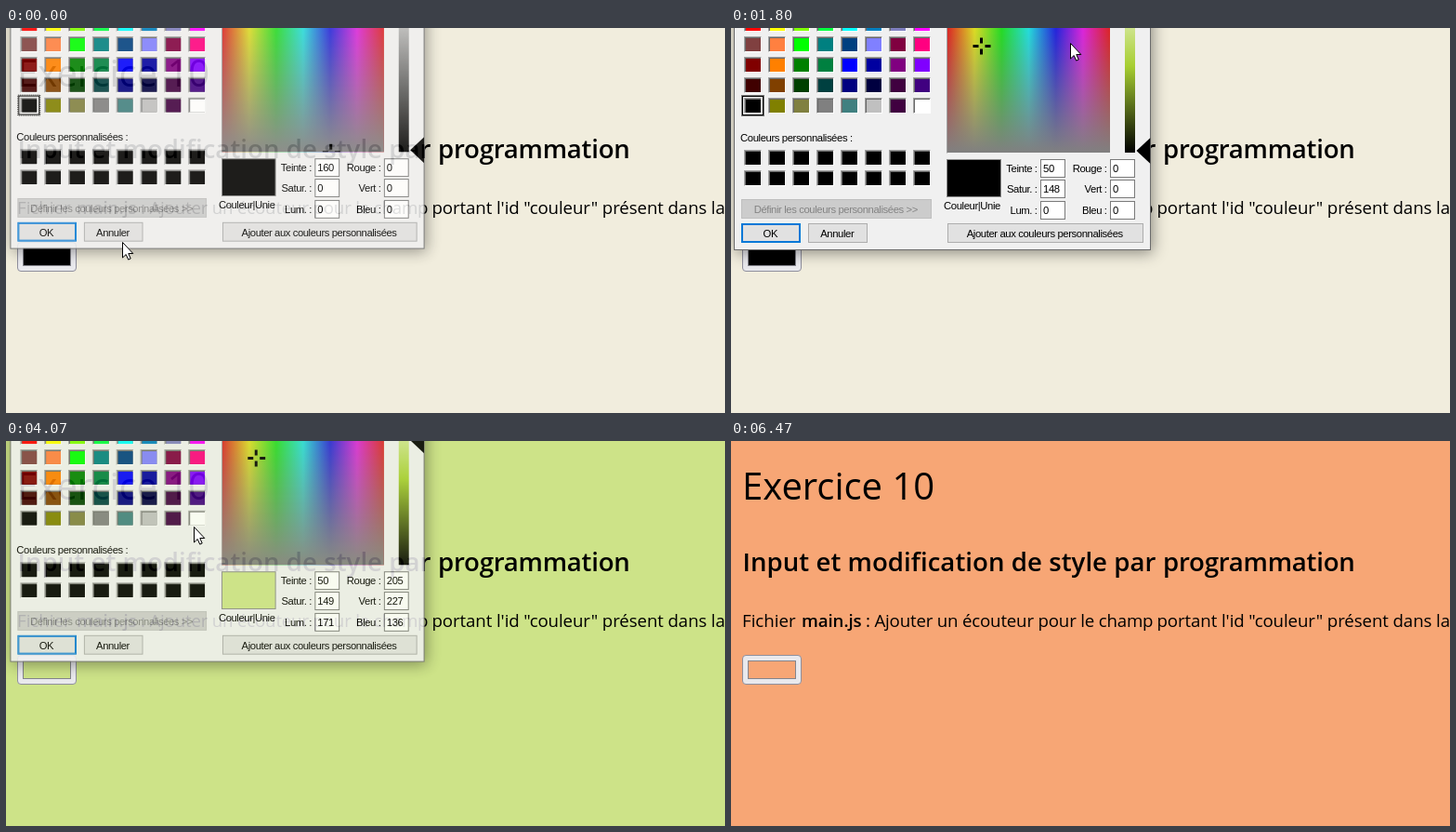
Write an HTML page that moves like this. It is 774 px wide and 414 px high and loops after 7.07 s.

```html
<!DOCTYPE html>
<html lang="fr">
<head>
<meta charset="utf-8">
<title>Exercice 10</title>
<style>
html, body { margin: 0; width: 100%; height: 100%; overflow: hidden; background: #f1eddd; }
svg { display: block; width: 774px; height: 414px; }
.page { font-family: "Open Sans", "Noto Sans", sans-serif; fill: #000; }
.strong { font-weight: 600; }
.ui { font: 11.3px "Liberation Sans", Arial, sans-serif; letter-spacing: -.4px; fill: #000; }
.mid { text-anchor: middle; }
.end { text-anchor: end; }
#dialog { transform-origin: 227px 17px; }
#frame { filter: drop-shadow(2px 3px 8px rgba(0, 0, 0, .42)); }
</style>
</head>
<body>
<svg viewBox="0 0 774 414" xmlns="http://www.w3.org/2000/svg">
  <defs>
    <linearGradient id="hues"></linearGradient>
    <linearGradient id="fade" gradientUnits="userSpaceOnUse" x1="0" y1="-52" x2="0" y2="134">
      <stop stop-color="#808080" stop-opacity="0"/><stop offset="1" stop-color="#808080"/>
    </linearGradient>
    <linearGradient id="lums" gradientUnits="userSpaceOnUse" x1="0" y1="-52" x2="0" y2="134">
      <stop stop-color="#fff"/><stop id="pure" offset=".5"/><stop offset="1"/>
    </linearGradient>
    <clipPath id="inField"><rect x="233" y="-52" width="175" height="186"/></clipPath>
    <clipPath id="inFrame"><rect x="3" y="-205" width="448.5" height="443"/></clipPath>
  </defs>

  <rect id="bg" width="774" height="414"/>
  <g class="page">
    <text x="12" y="63" font-size="40" font-weight="500">Exercice 10</text>
    <g class="strong" font-size="27.6">
      <text x="12.5" y="140" letter-spacing=".05">Input et modification de style par</text>
      <text x="465" y="140" letter-spacing="-.25">programmation</text>
    </g>
    <g font-size="18.7">
      <text x="12" y="200">Fichier</text>
      <text x="76" y="200" class="strong" letter-spacing="-.1">main.js</text>
      <text x="145" y="200" letter-spacing="-.19">: Ajouter un écouteur pour le champ</text>
      <text x="458.5" y="200" letter-spacing="-.1">portant l'id "couleur" présent dans la</text>
    </g>
  </g>
  <rect x="12.5" y="230.5" width="63" height="31" rx="3.5" fill="#e9e9ed" stroke="#8f8f9d"/>
  <rect id="input" x="18.5" y="236.5" width="51" height="19" stroke="#84848c"/>

  <g id="dialog">
    <rect id="frame" x="3.5" y="-205" width="448" height="443.5" fill="#f0f0f0" stroke="#6c6c6c"/>
    <g id="cells"></g>
    <g id="focus" fill="none" stroke="#000">
      <rect x="12.5" y="73.5" width="22" height="20"/>
      <rect id="dots" x="11.5" y="72.5" width="24" height="22" stroke-dasharray="1 1"/>
    </g>
    <text class="ui" x="10" y="122">Couleurs personnalisées :</text>

    <path d="M232.5 0V134.5" stroke="#a0a0a0"/>
    <rect x="233" y="-52" width="175" height="186" fill="url(#hues)"/>
    <rect x="233" y="-52" width="175" height="186" fill="url(#fade)"/>
    <g clip-path="url(#inField)">
      <path id="cross" d="M0 -9V-3M0 3V9M-9 0H-3M4 0H10" stroke="#000" stroke-width="3"/>
    </g>
    <rect x="424" y="-52" width="11" height="186" fill="url(#lums)"/>
    <g clip-path="url(#inFrame)"><path id="arrow" d="M0 0L15 -14V14Z"/></g>

    <rect id="sample" x="232.5" y="141.5" width="58" height="40" stroke="#8a8a8a"/>
    <text class="ui" x="229" y="195">Couleur|Unie</text>
    <g id="fields"></g>
    <g id="buttons"></g>
    <rect id="ring" x="12.5" y="211.5" width="61" height="18" fill="none" stroke="#0078d7"/>
  </g>

  <path id="cursor" d="M0 0V16.5L3.7 13 6.2 18.6 8.7 17.5 6.3 12H11.3Z" fill="#fff" stroke="#000"/>
</svg>

<script>
const $ = id => document.getElementById(id);
const NS = 'http://www.w3.org/2000/svg';
const LOOP = 7070, STEP = 1000 / 15;

function add(parent, tag, attrs, text) {
  const el = document.createElementNS(NS, tag);
  for (const k in attrs) el.setAttribute(k, attrs[k]);
  if (text) el.textContent = text;
  return $(parent).appendChild(el);
}

for (let i = 0; i <= 6; i++)
  add('hues', 'stop', { offset: i / 6, 'stop-color': `hsl(${i * 60},100%,50%)` });

// Basic colours: each hex digit is a channel level in sixteenths
const palette = [
  'f00 ff0 8f0 0f4 0ff 08c 88c f0f',
  '844 f84 0f0 088 048 88f 804 f08',
  '800 f80 080 084 00f 00a 808 80f',
  '400 840 040 044 008 004 404 408',
  '000 880 884 888 488 ccc 404 fff'
];
const level = d => d === 'f' ? 255 : parseInt(d, 16) * 16;

// A cell with a sunken edge
function cell(col, y, code) {
  const x = 14 + 26 * col;
  add('cells', 'rect', { x, y, width: 19, height: 17, fill: '#fff' });
  add('cells', 'path', { d: `M${x} ${y}h19l-1 1h-17v15l-1 1z`, fill: '#a0a0a0' });
  add('cells', 'rect', { x: x + 1, y: y + 1, width: 17, height: 15, fill: '#696969' });
  add('cells', 'rect', { x: x + 2, y: y + 2, width: 16, height: 14, fill: `rgb(${[...code].map(level)})` });
}
palette.forEach((row, r) => row.split(' ').forEach((code, i) => cell(i, 22 * r - 13, code)));
for (let i = 0; i < 16; i++) cell(i % 8, i < 8 ? 131 : 153, '000');

// Number fields
const values = ['Teinte :', 'Satur. :', 'Lum. :', 'Rouge :', 'Vert :', 'Bleu :'].map((name, i) => {
  const x = i < 3 ? 333.5 : 408.5, y = 141.5 + Math.floor(22.5 * (i % 3));
  add('fields', 'text', { class: 'ui end', x: x - 4, y: y + 13.5 }, name);
  add('fields', 'rect', { x, y, width: 26, height: 19, fill: '#fff', stroke: '#7a7a7a' });
  return add('fields', 'text', { class: 'ui', x: x + 2.5, y: y + 13.5 });
});

function button(x, y, w, label, fill = '#e1e1e1', stroke = '#adadad', ink = '#000') {
  const box = add('buttons', 'rect', { x: x + .5, y: y + .5, width: w - 1, height: 20, fill, stroke });
  add('buttons', 'text', { class: 'ui mid', x: x + w / 2 - .7, y: y + 15, style: `fill:${ink}` }, label);
  return box;
}
button(11, 184, 205, 'Définir les couleurs personnalisées >>', '#ccc', '#bfbfbf', '#838383');
button(83, 210, 64, 'Annuler');
button(233, 210, 211, 'Ajouter aux couleurs personnalisées');
const ok = button(11, 210, 64, 'OK');

// All moments are counted in steps of 1/15 s
const black = [0, 0, 0], green = [205, 227, 136], orange = [247, 166, 117];
const picks = [
  { at: 0, hsl: [160, 0, 0], rgb: black },
  { at: 10, hsl: [50, 148, 0], rgb: black },
  { at: 30, hsl: [50, 148, 171], rgb: green },
  { at: 60, hsl: [50, 149, 171], rgb: green },
  { at: 71, hsl: [15, 213, 171], rgb: orange }
];
const pages = [{ at: 0, rgb: [241, 237, 221] }, { at: 44, rgb: green }, { at: 87, rgb: orange }];
const visits = [{ open: -2, close: 45 }, { open: 59, close: 86 }];

// Cursor stops: arrival, place, pause before moving on
const stops = [
  [0, 125, 230, 1], [10, 270, 19, 1], [15, 272, 141, 0], [18, 131, 178, 0], [22, 385, 120, 0],
  [27, 365, 16, 0], [30, 436, 1, 3], [37, 31, 185, 3], [42, 30, 220, 10], [54, 44, 240, 2],
  [61, 202, 92, 0], [66, 250, -25, 8], [75, 305, 13, 0], [85, 57, 224, 6], [97, 72, 416, 10]
];

const clamp = u => Math.min(1, Math.max(0, u));
const smooth = u => u * u * (3 - 2 * u);
const easeOut = u => 1 - (1 - u) ** 3;
const current = (list, n) => list.filter(e => e.at <= n).pop();

function cursorAt(n) {
  const i = stops.filter(s => s[0] <= n).length - 1;
  const [at, x, y, pause] = stops[i];
  const [next, x2, y2] = stops[i + 1] || [LOOP, x, y];
  const u = smooth(clamp((n - at - pause) / (next - at - pause)));
  return [x + (x2 - x) * u, y + (y2 - y) * u];
}

const presence = n => Math.max(...visits.map(v =>
  easeOut(clamp((n - v.open) / 4)) * (1 - clamp((n - v.close) / 3))));

const move = (id, x, y) => $(id).setAttribute('transform', `translate(${x} ${y})`);
const show = (id, on) => { $(id).style.display = on ? '' : 'none'; };

function draw(time) {
  const n = Math.floor((time + 5) / STEP);
  const { hsl, rgb } = current(picks, n);
  const [hue, sat, lum] = hsl;

  $('bg').setAttribute('fill', `rgb(${current(pages, n).rgb})`);
  for (const id of ['input', 'sample']) $(id).setAttribute('fill', `rgb(${rgb})`);
  $('pure').setAttribute('stop-color', `hsl(${hue * 1.5},${sat / 2.4}%,50%)`);
  [...hsl, ...rgb].forEach((v, i) => { values[i].textContent = v; });
  move('cross', 233.5 + Math.round(175 * hue / 240), 134.5 - Math.round(sat * .777));
  move('arrow', 436.5, 132 - lum * .777);

  const alpha = presence(n);
  $('dialog').style.opacity = alpha;
  $('dialog').style.transform = `scale(${.95 + .05 * alpha})`;
  show('focus', n < visits[1].open);
  show('dots', lum === 0);

  const [x, y] = cursorAt(n);
  move('cursor', x + .5, y + .5);
  const hot = x > 11 && x < 75 && y > 209 && y < 232;
  ok.setAttribute('fill', hot ? '#d3e8f3' : '#e1e1e1');
  ok.setAttribute('stroke', hot ? '#1b6fae' : '#0078d7');
  show('ring', !hot);
}

const start = performance.now();
function tick() {
  draw((performance.now() - start) % LOOP);
  requestAnimationFrame(tick);
}
tick();
</script>
</body>
</html>
```
